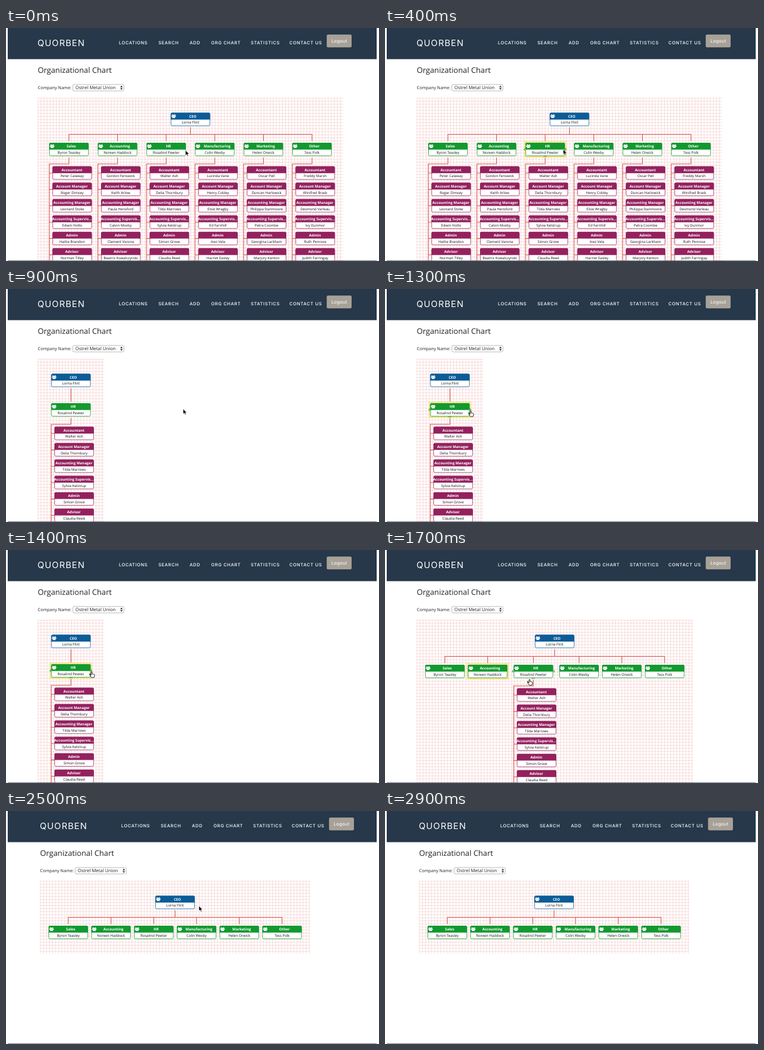
Animation of 640 by 400 pixels, one loop 3 s. Source, as an HTML page:

```html
<!DOCTYPE html>
<html lang="en">
<head>
<meta charset="utf-8">
<title>Organizational Chart</title>
<style>
  html, body { margin: 0; width: 100%; height: 100%; overflow: hidden; background: #fff; }
  svg { display: block; width: 640px; height: 400px; text-rendering: geometricPrecision; }
  text { font-family: "Open Sans", "Noto Sans", sans-serif; fill: #222; }
  .caps { font-family: Inter, "Open Sans", sans-serif; fill: #fff; }
  .brand { font-size: 15px; letter-spacing: 1.1px; }
  .nav { font-size: 7.6px; font-weight: 500; letter-spacing: .65px; text-anchor: middle; }
  .btn { font-size: 7.8px; letter-spacing: .2px; text-anchor: middle; }
  .job { font-size: 6.2px; font-weight: 700; fill: #fff; text-anchor: middle; }
  .who { font-size: 6.1px; fill: #111; text-anchor: middle; }
  .grid { stroke: #c80000; stroke-opacity: .17; stroke-width: .8; fill: none; }
  .link { stroke: #d9534f; stroke-width: 1.1; fill: none; }
  .glow { fill: #eed936; fill-opacity: .5; }
  .chev { stroke: #3f9d46; stroke-width: 1.1; fill: none; }

  .page, .scene, .fx, .cur, .glyph { animation: 3s step-end infinite; }
  .page { animation-name: page; }
  #full { animation-name: full; }
  #solo { animation-name: solo; }
  #wide { animation-name: wide; }
  #flat { animation-name: flat; }
  #full .tree { animation-name: fullTree; }
  #full .sib { animation-name: sibOut; }
  #full .hover { animation-name: fullHover; }
  #solo .hover { animation-name: soloHover; }
  #wide .sib { animation-name: sibIn; }
  #wide .kids { animation-name: fold; }
  #wide .stale { animation-name: stale; }
  #wide .hover { animation-name: wideHover; }
  .cur { animation-name: move; }
  .arrow { animation-name: arrow; }
  .hand { animation-name: hand; }
  .beam { animation-name: beam; }

  @keyframes page { 0% { transform: none } 73.2%, 100% { transform: translateX(4px) } }

  @keyframes full { 0% { visibility: visible } 29.9%, 100% { visibility: hidden } }
  @keyframes solo { 0% { visibility: hidden } 29.9% { visibility: visible } 49.9%, 100% { visibility: hidden } }
  @keyframes wide { 0% { visibility: hidden } 49.9% { visibility: visible } 73.2%, 100% { visibility: hidden } }
  @keyframes flat { 0% { visibility: hidden } 73.2%, 100% { visibility: visible } }

  @keyframes fullTree { 0% { opacity: 1 } 16.6%, 100% { opacity: 0 } }
  @keyframes sibOut { 0% { opacity: 1 } 16.6% { opacity: .7 } 19.9% { opacity: .42 } 23.2% { opacity: .17 } 26.6%, 100% { opacity: 0 } }
  @keyframes fullHover { 0% { opacity: 0 } 6.6%, 100% { opacity: 1 } }
  @keyframes soloHover { 0% { opacity: 0 } 39.9%, 100% { opacity: 1 } }
  @keyframes sibIn { 0% { opacity: .5 } 53.2%, 100% { opacity: 1 } }
  @keyframes fold {
    0% { opacity: 1; transform: none }
    63.2% { opacity: .7; transform: translateY(-8px) }
    66.6% { opacity: .3; transform: translateY(-20px) }
    69.9%, 100% { opacity: 0; transform: translateY(-28px) }
  }
  @keyframes stale { 0% { opacity: 1 } 59.9%, 100% { opacity: 0 } }
  @keyframes wideHover { 0% { opacity: 0 } 59.9%, 100% { opacity: 1 } }

  @keyframes move {
    0% { transform: translate(308px, 210px); animation-timing-function: steps(2) }
    6.6% { transform: translate(307px, 210px); animation-timing-function: steps(5) }
    23.2%, 29.9% { transform: translate(304px, 206px); animation-timing-function: steps(3) }
    39.9%, 49.9% { transform: translate(147px, 209px); animation-timing-function: steps(2) }
    56.6% { transform: translate(248px, 222px); animation-timing-function: steps(2) }
    63.2%, 73.2% { transform: translate(254px, 222px); animation-timing-function: steps(3) }
    83.2%, 86.6% { transform: translate(331px, 163px); animation-timing-function: steps(2) }
    93.2%, 100% { transform: translate(420px, -20px) }
  }
  @keyframes arrow { 0% { opacity: 1 } 39.9% { opacity: 0 } 73.2%, 100% { opacity: 1 } }
  @keyframes hand { 0% { opacity: 0 } 39.9% { opacity: 1 } 66.6%, 100% { opacity: 0 } }
  @keyframes beam { 0% { opacity: 0 } 66.6% { opacity: 1 } 73.2%, 100% { opacity: 0 } }
</style>
</head>
<body>
<svg viewBox="0 0 640 400">
  <defs>
    <g id="team" fill="#fff">
      <circle cx="1.9" cy="1.4" r="1.1"/><circle cx="6.1" cy="1.4" r="1.1"/>
      <rect y="2.6" width="2.7" height="2" rx=".8"/><rect x="5.3" y="2.6" width="2.7" height="2" rx=".8"/>
      <circle cx="4" cy="2.3" r="1.5"/>
      <path d="M1.5 6.6V5.5Q1.6 3.9 3 3.9H5Q6.4 3.9 6.5 5.5V6.6Z"/>
    </g>
  </defs>
  <rect x="3" width="633" height="53.5" fill="#263849"/>
  <g class="page" id="page">
    <text class="caps brand" x="54" y="31.2">QUORBEN</text>
    <rect x="550.3" y="11.3" width="42.7" height="21.9" rx="2.2" fill="#a8a198"/>
    <text class="caps btn" x="571.7" y="25">Logout</text>
    <text x="54.5" y="77" font-size="13.2">Organizational Chart</text>
    <text x="54.5" y="105" font-size="7.4">Company Name:</text>
    <rect x="114.7" y="97" width="87.6" height="11" rx="2.2" fill="#fff" stroke="#a5a5a5" stroke-width=".8"/>
    <text x="119" y="105.2" font-size="7.9">Ostrel Metal Union</text>
    <path d="M196 101.7l2.1-3 2.1 3zM196 103.3l2.1 3 2.1-3z" fill="#333"/>
  </g>
  <g id="charts"></g>
  <rect x="3" y="399" width="633" height="1" fill="#6c7680"/>
  <g class="cur">
    <path class="glyph arrow" d="M0 0V8.6L2 6.8 3.3 9.8 4.8 9.2 3.5 6.3H6.1Z" fill="#000" stroke="#fff" stroke-width=".6"/>
    <path class="glyph hand" d="M-.9.6Q0-.6.9.6V4L2.2 3.8 3.4 4.2 4.6 4.6 5 6.2 4.2 10H-.5L-3 6.4Q-3-.0-3 5.4L-.9 6.2Z" fill="#fff" stroke="#111" stroke-width=".9" stroke-linejoin="round"/>
    <path class="glyph beam" d="M-1.8-3.5Q0-3.5 0-2.5 0-3.5 1.8-3.5M0-3V4M-1.8 4.5Q0 4.5 0 3.5 0 4.5 1.8 4.5" fill="none" stroke="#222" stroke-width=".9"/>
  </g>
</svg>
<script>
const W = 67.6, ROW = 28.1, CELL = 5.243, HR = 2;
const BLUE = '#0c5c97', GREEN = '#12992f', PLUM = '#94215e';
const boss = 'Lorna Flint';
const jobs = ['Accountant', 'Account Manager', 'Accounting Manager', 'Accounting Supervis…', 'Admin', 'Advisor'];
const teams = [
  ['Sales', 'Byron Teasley', 'Peter Calaway', 'Roger Dimsey', 'Leonard Stoke', 'Edwin Hollis', 'Hattie Brandon', 'Norman Tilley'],
  ['Accounting', 'Noreen Haddock', 'Gordon Fenswick', 'Keith Arlow', 'Paula Hensford', 'Calvin Moxby', 'Clement Varona', 'Beatrix Kowalczynski'],
  ['HR', 'Rosalind Pewter', 'Walter Ash', 'Delia Thornbury', 'Tilda Marrows', 'Sylvia Kelstrup', 'Simon Grove', 'Claudia Reed'],
  ['Manufacturing', 'Colin Wexby', 'Lucinda Vane', 'Henry Cobley', 'Elsie Wragby', 'Ed Farnhill', 'Inez Vela', 'Harriet Easley'],
  ['Marketing', 'Helen Orwick', 'Oscar Pell', 'Duncan Harlowick', 'Philippa Stanmoore', 'Petra Coombe', 'Georgina Larkham', 'Marjory Kenton'],
  ['Other', 'Tess Polk', 'Freddy Marsh', 'Winifred Brask', 'Desmond Varleau', 'Ivy Dunmor', 'Ruth Penrose', 'Judith Farringay']
];

const group = (cls, body) => `<g class="${cls}">${body}</g>`;
const link = d => `<path class="link" d="${d}"/>`;
const chev = d => `<path class="chev" d="${d}"/>`;

function node(x, y, color, job, name, icon = true) {
  const mid = x + W / 2;
  return `<rect x="${x + .4}" y="${y + .4}" width="${W - .8}" height="22" rx="2" fill="#fff" stroke="${color}" stroke-width=".8"/>
    <path d="M${x} ${y + 11.7}v-9.7q0-2 2-2h${W - 4}q2 0 2 2v9.7z" fill="${color}"/>
    ${icon ? `<use href="#team" x="${x + 1}" y="${y + 2.4}"/>` : ''}
    <text class="job" x="${mid + (icon ? 4 : -.4)}" y="${y + 8}">${job}</text>
    <text class="who" x="${mid}" y="${y + 18.9}">${name}</text>`;
}

const glow = (x, y) => `<rect class="glow" x="${x - 2.6}" y="${y - 2.8}" width="${W + 5.2}" height="28.4"/>`;

function arrows(x, y) {
  const l = x - 1.6, r = x + W + 1.6, m = x + W / 2;
  return chev(`M${l + 1.2} ${y + 9.2}l-2 2 2 2M${r - 1.2} ${y + 9.2}l2 2-2 2M${m - 2.6} ${y + 24.4}l2.6-2.2 2.6 2.2`);
}

function grid(x, w, h) {
  let d = '';
  for (let i = x + .3; i < x + w; i += CELL) d += `M${i.toFixed(2)} 120v${h}`;
  for (let j = 120.4; j < 120 + h; j += CELL) d += `M${x} ${j.toFixed(2)}h${w}`;
  return `<path class="grid" d="${d}"/>`;
}

// Lines from the CEO down to each team head.
function tree(ceo, heads, y) {
  const top = ceo + W / 2, mids = heads.map(x => x + W / 2);
  if (mids.length === 1) return link(`M${top} 170.5V${y - 3}`);
  return link(`M${top} 170.5V182.5M${mids[0] - .5} 182.5H${mids.at(-1) + .5}` + mids.map(m => `M${m} 182.5V${y - 3}`).join(''));
}

function kidLinks(x, y) {
  const stubs = jobs.map((_, i) => `M${x} ${y + 52 + i * ROW}h5.5`).join('');
  return link(`M${x + W / 2} ${y + 25.6}v10.6H${x}V400${stubs}`);
}

const kids = (team, x, y) => jobs.map((job, i) =>
  node(x + 5.5, y + 40.5 + i * ROW, PLUM, job, team[i + 2], false)).join('');

function chart({ id, x, w, h = 280, ceo, heads, shown = teams, open = () => false, y = 197, stale }) {
  let out = grid(x, w, h) + group('fx tree', tree(ceo, heads, y)) + node(ceo, 145.5, BLUE, 'CEO', boss);
  shown.forEach((team, i) => {
    const left = heads[i], main = team === teams[HR], unfolded = open(team);
    if (unfolded) out += kidLinks(left, y);
    if (main) out += group('fx hover', id === 'flat' ? '' : glow(left, y));
    if (stale && i === 1) out += group('fx stale', glow(left, y));
    let box = node(left, y, GREEN, team[0], team[1]);
    if (main && id !== 'flat') box += stale ? arrows(left, y) : group('fx hover', arrows(left, y));
    if (unfolded) box += group('fx kids', kids(team, left, y));
    out += group(main ? '' : 'fx sib', box);
  });
  return `<g class="scene" id="${id}">${out}</g>`;
}

const spread = (start, step) => teams.map((_, i) => start + i * step);
const onlyHR = team => team === teams[HR];

document.getElementById('charts').innerHTML = [
  { id: 'full', x: 54.5, w: 524, ceo: 282.7, heads: spread(74.2, 83.4), open: () => true },
  { id: 'solo', x: 54.5, w: 114, ceo: 77.6, heads: [77.6], shown: [teams[HR]], open: onlyHR, y: 196 },
  { id: 'wide', x: 54.5, w: 473.5, ceo: 257.3, heads: [69, 142.4, 220.8, 299.2, 372.6, 446], open: onlyHR, stale: true },
  { id: 'flat', x: 58.6, w: 463.5, h: 125, ceo: 256.3, heads: spread(73.1, 73.35) }
].map(chart).join('');

const menu = { LOCATIONS: 218.4, SEARCH: 279, ADD: 324.2, 'ORG CHART': 377.5, STATISTICS: 444.9, 'CONTACT US': 514.3 };
document.getElementById('page').insertAdjacentHTML('beforeend',
  Object.entries(menu).map(([label, x]) => `<text class="caps nav" x="${x}" y="28.4">${label}</text>`).join(''));
</script>
</body>
</html>
```
